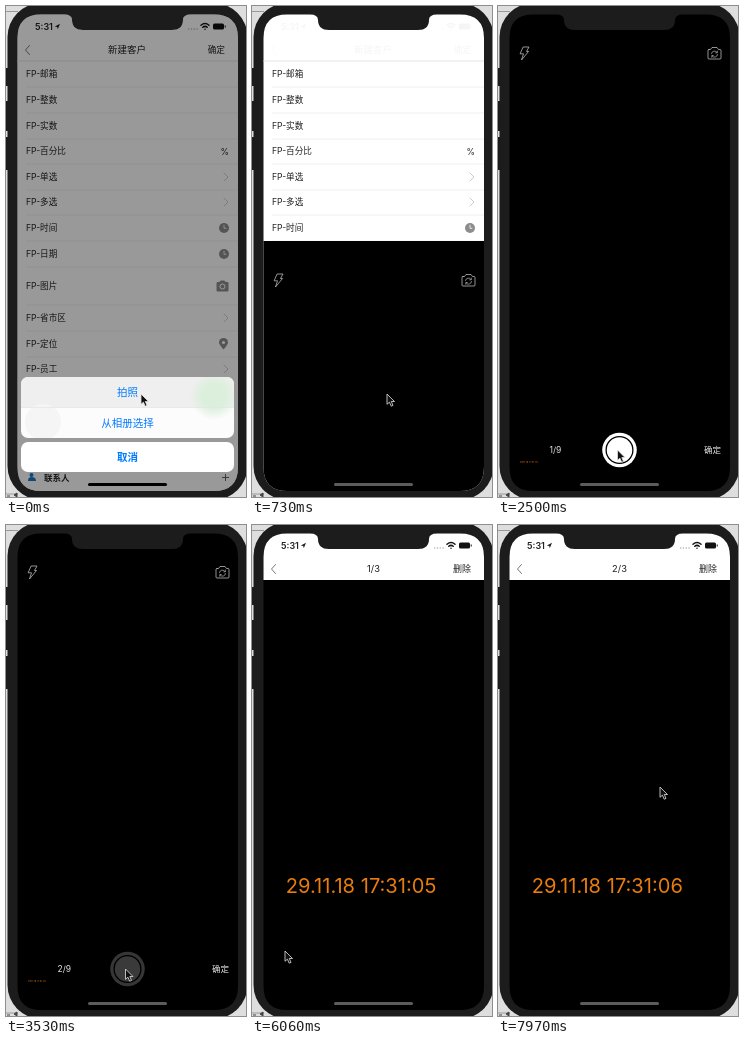
An HTML page for the animation above (8000 ms loop, 240 by 491 pixels).

```html
<!DOCTYPE html>
<html lang="zh">
<head>
<meta charset="utf-8">
<style>
html, body { margin: 0; width: 100%; height: 100%; overflow: hidden; background: #dedede; }
svg { display: block; width: 100%; height: 100%; }
text { font-family: Inter, "Noto Sans CJK SC", "Noto Sans CJK", sans-serif; fill: #222; }
.mid { text-anchor: middle; }
.end { text-anchor: end; }
.row { font-size: 8.6px; }
.blue { font-size: 10.5px; fill: #007aff; }
.white { font-size: 8.5px; fill: #e4e4e4; }
.date { font-size: 20.1px; fill: #e87d0d; }
.line { fill: none; stroke-linecap: round; stroke-linejoin: round; }
</style>
</head>
<body>
<svg viewBox="0 0 240 491" preserveAspectRatio="none">
  <defs>
    <clipPath id="screen"><path d="M35 8.500H58Q66 8.500 66 14Q66 24 77 24H166Q177 24 177 14Q177 8.500 185 8.500H208Q232 8.500 232 32V461Q232 485 208 485H35Q11.500 485 11.500 461V32Q11.500 8.500 35 8.500Z"/></clipPath>
    <clipPath id="panel"><rect x="15" y="371" width="213" height="61" rx="7"/></clipPath>
    <radialGradient id="green"><stop offset=".5" stop-color="#dcefdc"/><stop offset="1" stop-color="#dcefdc" stop-opacity="0"/></radialGradient>
    <g id="status">
      <text x="29" y="23.500" font-size="9" font-weight="600">5:31</text>
      <path d="M48.800 20.400L54 17.800L51.800 23.200L51.200 20.900Z" fill="#222"/>
      <path d="M182 23H192" stroke="#999" stroke-width="1.200" stroke-dasharray="1.300 1.500"/>
      <g class="line" stroke="#111" stroke-width="1.500"><path d="M195 19.200Q199 15.800 203 19.200M196.800 21.300Q199 19.400 201.200 21.300M199 23.200V23.300"/></g>
      <rect x="207" y="17.500" width="11" height="6" rx="1.500" fill="#111"/><path d="M219.200 19.500V21.500" stroke="#111"/>
    </g>
    <path id="back" class="line" d="M23.500 39.500L19.500 44L23.500 48.500" stroke="#777"/>
    <g id="clock"><circle r="5" fill="#8c8c8c"/><path class="line" d="M0-2.800V.3H2" stroke="#fff" stroke-width=".8"/></g>
  </defs>

  <path d="M0 5.500H12M0 488H12" stroke="#999"/>
  <path d="M1 490H4M8 489L11 487V491Z" stroke="#444" fill="#444"/>
  <path d="M1 62V80M1 95V125M1 131V164" stroke="#1c1c1c" stroke-width="2"/>
  <rect x="1.500" y="-3" width="240" height="497" rx="34" fill="#1c1c1c"/>

  <g clip-path="url(#screen)">
    <g id="form">
      <rect x="11" y="8" width="221" height="477" fill="#fff"/>
      <g id="formNav">
        <use href="#status"/><use href="#back"/>
        <text class="mid" x="121" y="47.300" font-size="9.500">新建客户</text>
        <text class="end" x="219" y="47" font-size="8.700" font-weight="500">确定</text>
      </g>
      <path d="M11 55H232" stroke="#e4e4e4"/>
      <g id="rows"></g>
      <text class="end row" x="223" y="148.500">%</text>
      <use href="#clock" x="218" y="222"/><use href="#clock" x="218" y="248"/>
      <path d="M211 276.500H213.500L214.500 275H218.500L219.500 276.500H222V285H211Z" fill="#8c8c8c" stroke="#8c8c8c"/>
      <circle cx="216.500" cy="280.500" r="2.500" fill="none" stroke="#fff"/>
      <path d="M217.500 343.500Q213 338.500 213 336.500A4.500 4.500 0 0 1 222 336.500Q222 338.500 217.500 343.500Z" fill="#8c8c8c"/><circle cx="217.500" cy="336.500" r="1.600" fill="#fff"/>
      <path d="M22 475Q22 471 25.500 471Q30 471 30 475Z" fill="#1976c5"/><circle cx="25.500" cy="469" r="2" fill="#1976c5"/>
      <text x="38" y="474.500" font-size="8.500" font-weight="700">联系人</text>
      <path d="M216 471.500H223M219.500 468V475" stroke="#555" stroke-width=".9"/>
    </g>
    <rect id="dim" x="11" y="8" width="221" height="477"/>

    <g id="sheet">
      <g clip-path="url(#panel)">
        <rect x="15" y="371" width="213" height="61" fill="#fcfcfc"/>
        <rect x="15" y="371" width="213" height="30.500" fill="#efefef"/>
        <circle cx="208" cy="390" r="24" fill="url(#green)"/>
        <circle cx="37" cy="416" r="18" fill="#f5f5f5"/>
        <path d="M15 401.500H228" stroke="#e4e4e4" stroke-width=".7"/>
      </g>
      <rect x="15" y="436" width="213" height="30" rx="7" fill="#fff"/>
      <text class="blue mid" x="121.500" y="390">拍照</text>
      <text class="blue mid" x="121.500" y="420.500">从相册选择</text>
      <text class="blue mid" x="121.500" y="455" font-weight="600">取消</text>
    </g>

    <g id="camera">
      <rect x="11" y="8" width="221" height="480"/>
      <g class="line" stroke="#b8b8b8" stroke-width=".8">
        <path d="M25.500 41H31L28.500 45.500H30.500L23.500 54L25.500 47.800H22.500Z"/>
        <path d="M211 43.500H212.500L214 41.500H219L220.500 43.500H222Q223 43.500 223 44.500V52Q223 53 222 53H211Q210 53 210 52V44.500Q210 43.500 211 43.500Z"/>
        <path d="M213.500 47.500A3 3 0 0 1 219 46.500M219.500 48.500A3 3 0 0 1 214 49.800M219.300 45V46.800H217.800M213.800 51.300V49.600H215.300" stroke-width=".7"/>
      </g>
      <g id="shutter">
        <circle cx="121.500" cy="444" r="17.300"/>
        <circle cx="121.500" cy="444" r="13.400" stroke="#000" stroke-width="1.300"/>
      </g>
      <text id="cancel" class="white" x="20" y="447">取消</text>
      <g id="taken">
        <text x="22" y="457" font-size="2.400" style="fill:#c96a10">29.11.18 17:31:05</text>
        <text id="count" class="white" x="51.500" y="447"></text>
      </g>
      <text id="confirm" class="white end" x="223" y="447">确定</text>
    </g>

    <g id="preview">
      <rect x="11" y="8" width="221" height="477"/>
      <g id="pages">
        <text class="date" x="33.800" y="368">29.11.18 17:31:05</text>
        <text class="date" x="254.800" y="368">29.11.18 17:31:06</text>
      </g>
      <rect x="11" y="8" width="221" height="47" fill="#fff"/>
      <use href="#status"/><use href="#back"/>
      <text id="page" class="mid" x="121.500" y="47" font-size="9.300"></text>
      <text class="end" x="219" y="47" font-size="9" font-weight="500">删除</text>
    </g>
    <rect id="home" x="82" y="477" width="79" height="3" rx="1.500"/>
  </g>
  <path id="cursor" d="M0 0V10.300L2.400 8.200L4.200 12.200L6 11.400L4.300 7.500H7.500Z" fill="#111" stroke="#e4e4e4" stroke-width=".8"/>
</svg>
<script>
const $ = id => document.getElementById(id);
const LOOP = 8000, TICK = 147.4, SCREEN_WIDTH = 221;

const rows = [
  ['邮箱', 68], ['整数', 94], ['实数', 120], ['百分比', 145], ['单选', 171, true], ['多选', 196, true],
  ['时间', 222], ['日期', 248], ['图片', 280], ['省市区', 312, true], ['定位', 338], ['员工', 363, true]
];
$('rows').innerHTML = rows.map(([name, y, chevron], i) => {
  const edge = y === 280 ? 299 : y + 13;
  return `<text class="row" x="20" y="${y + 3.2}">FP-${name}</text>` +
    (rows[i + 1] ? `<path d="M20 ${edge}H232" stroke="#ececec" stroke-width=".8"/>` : '') +
    (chevron ? `<path class="line" d="M218 ${y - 4}L222 ${y}L218 ${y + 4}" stroke="#ccc"/>` : '');
}).join('');

// Tracks hold [tick, ...values], interpolated linearly.
const tracks = {
  sheet: [[1, 0], [2, 25], [3, 95], [4, 130]],
  dim: [[1, .4], [2, .36], [3, .16], [4, 0]],
  nav: [[3, 1], [4, .4], [5, .04]],
  camera: [[3, 480], [4, 410], [5, 227], [6, 75], [7, 15], [8, 0]],
  push: [[36, 1], [37, .8], [38, .35], [39, .1], [40, .02], [41, 0]],
  swipe: [[44, 0], [45, 12], [46, 50], [47, 110], [48, 172], [49, 206], [50, 218], [51, 221]],
  cursor: [[9, 135, 388], [10, 129, 408], [11, 122, 432], [12, 119.5, 444], [27, 119.5, 444], [29, 84, 449],
    [31, 29, 452], [32, 25, 450.5], [39, 25, 450.5], [41, 33, 426], [42, 82, 375], [44, 196, 268],
    [45, 188, 267], [48, 100, 264], [50, 120, 264], [52, 170, 263], [53, 170, 263], [54, 162, 262]]
};

function sample(track, tick) {
  const i = track.findIndex(key => key[0] > tick);
  if (i === 0) return track[0].slice(1);
  if (i < 0) return track[track.length - 1].slice(1);
  const a = track[i - 1], b = track[i], k = (tick - a[0]) / (b[0] - a[0]);
  return a.slice(1).map((v, n) => v + (b[n + 1] - v) * k);
}

const move = (id, x, y) => $(id).setAttribute('transform', `translate(${x} ${y})`);
const show = (id, visible) => $(id).style.display = visible ? '' : 'none';
const fade = (id, opacity) => $(id).style.opacity = opacity;
const within = (tick, from, to) => tick >= from && tick < to;

function render(time) {
  const tick = Math.floor((time % LOOP + 12) / TICK);
  const at = name => sample(tracks[name], tick);
  const [push] = at('push'), [swipe] = at('swipe');

  show('form', tick < 8);
  move('sheet', 0, at('sheet')[0]);
  show('sheet', tick < 4);
  fade('dim', at('dim')[0]);
  show('dim', tick < 4);
  fade('formNav', at('nav')[0]);

  move('camera', -(1 - push) * SCREEN_WIDTH * .3, at('camera')[0]);
  show('camera', within(tick, 4, 41));
  const pressed = within(tick, 14, 15) || within(tick, 19, 21) || within(tick, 24, 26);
  const [ring, core] = $('shutter').children;
  ring.setAttribute('fill', pressed ? '#363636' : '#fff');
  core.setAttribute('fill', pressed ? '#3a3a3a' : '#fff');
  const photos = [16, 22, 27].filter(t => tick >= t).length;
  show('cancel', !photos);
  show('taken', photos);
  show('confirm', photos);
  $('count').textContent = photos + '/9';
  fade('taken', within(tick, 35, 37) ? .35 : 1);

  move('preview', push * SCREEN_WIDTH, 0);
  show('preview', tick >= 37);
  move('pages', -swipe, 0);
  $('page').textContent = (swipe > SCREEN_WIDTH / 2 ? 2 : 1) + '/3';

  $('home').setAttribute('fill', tick < 4 ? '#000' : '#5c5c5c');
  move('cursor', ...at('cursor'));
}

const start = performance.now();
function loop() {
  render(performance.now() - start);
  requestAnimationFrame(loop);
}
loop();
</script>
</body>
</html>
```
